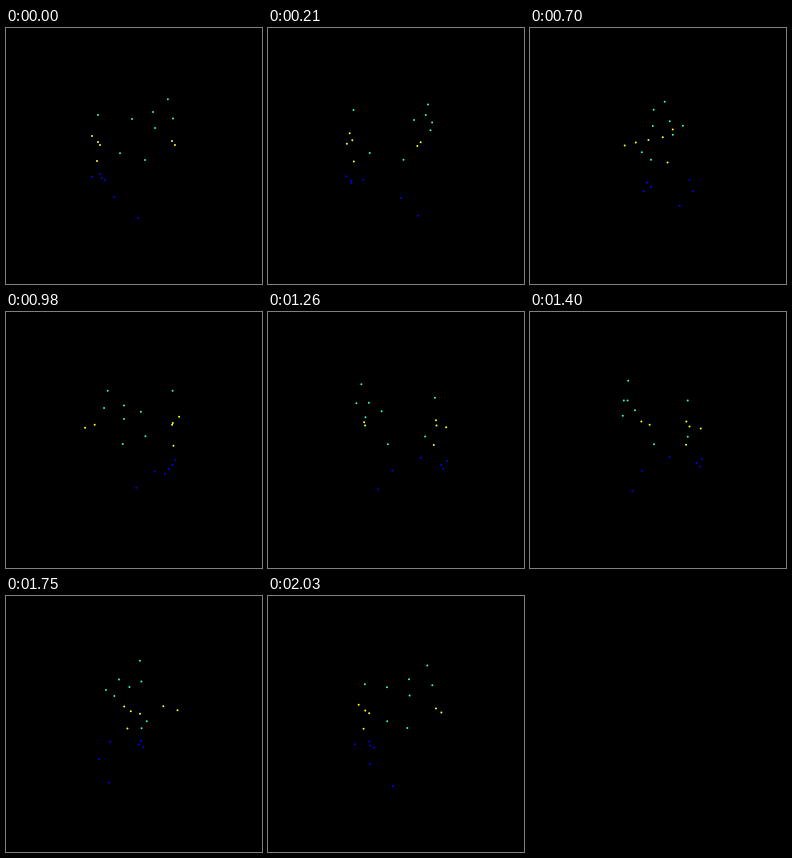
These frames come from a looping animation (256x256 px, 2100 ms). An HTML page with a canvas:

```html
<!DOCTYPE html>
<html lang="en">
<head>
<meta charset="utf-8">
<title>Rotating points</title>
<style>
  html, body { margin: 0; width: 100%; height: 100%; overflow: hidden; background: #000; }
  canvas { display: block; width: 256px; height: 256px; }
</style>
</head>
<body>
<canvas id="stage" width="256" height="256"></canvas>
<script>
const ctx = document.getElementById('stage').getContext('2d');
const STEP_MS = 70, STEPS = 30, MID = 128, CAMERA = 221, RADIUS = 1;

// Each point is [x, depth toward the viewer, y] around the vertical axis.
const groups = [
  { color: '#2cffc4', points: [
    [31.9, 12.7, -53.5], [16.9, 25, -39], [36.5, 14, -35.1], [-1.7, 29.5, -32],
    [-38.6, -16, -44], [18.2, 30, -24.2], [-15.6, -25.5, -3.2], [11.1, -2, 4]
  ] },
  { color: '#ffff20', points: [
    [-44.3, -12, -21.1], [-38.9, -18, -15.1], [-38.8, -31, -12.5],
    [-39.3, -13.7, 5.3], [39.1, -6.6, -15.4], [44.3, -18, -11.9]
  ] },
  { color: '#0000ff', points: [
    [3.5, 29, 53.9], [-17.2, 30.6, 35.3], [-40.5, 7.8, 20.3],
    [-39, -32.4, 20.6], [-36, -27.3, 24.8], [-33.2, -32.2, 27.9]
  ] }
];

function drawPoint([x, z, y], cos, sin) {
  const scale = CAMERA / (CAMERA + x * sin - z * cos);
  ctx.beginPath();
  ctx.arc(MID + (x * cos + z * sin) * scale, MID + y * scale, RADIUS, 0, Math.PI * 2);
  ctx.fill();
}

function draw(time) {
  const step = Math.floor(time / STEP_MS) % STEPS;
  const angle = step / STEPS * Math.PI * 2;
  const cos = Math.cos(angle), sin = Math.sin(angle);
  ctx.fillStyle = '#000';
  ctx.fillRect(0, 0, 256, 256);
  for (const { color, points } of groups) {
    ctx.fillStyle = color;
    for (const point of points) drawPoint(point, cos, sin);
  }
}

function tick(now) {
  draw(now);
  requestAnimationFrame(tick);
}

draw(0);
requestAnimationFrame(tick);
</script>
</body>
</html>
```
